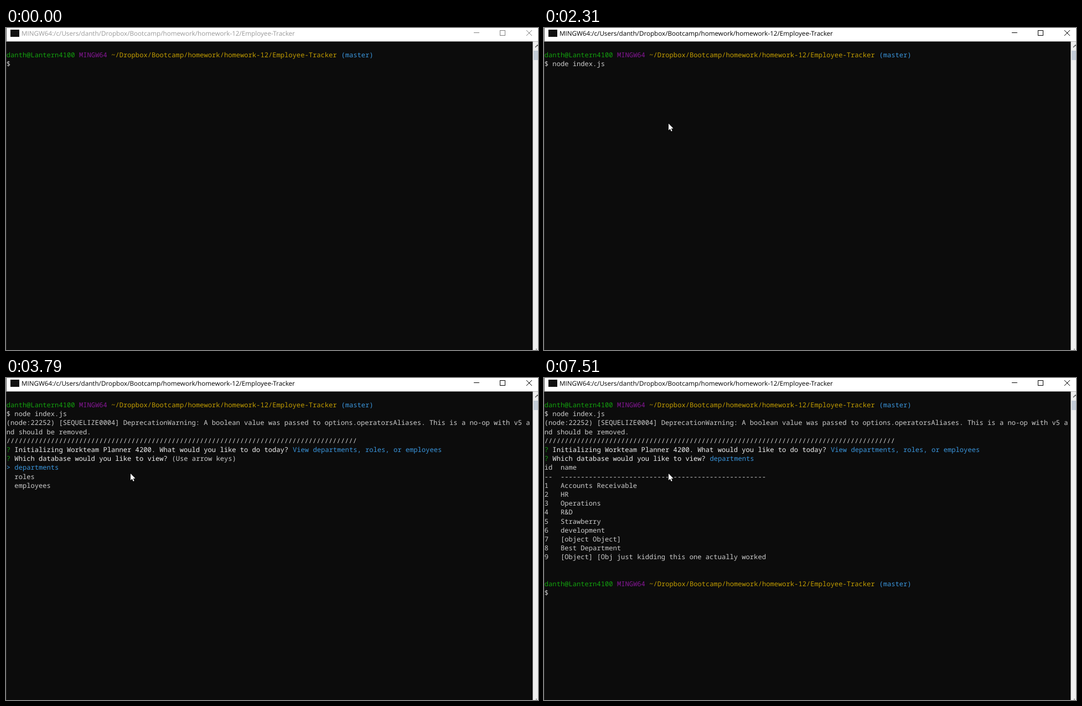
An HTML page with a canvas for the animation above (8 s loop, 961 by 583 pixels).

```html
<!DOCTYPE html>
<html lang="en">
<head>
<meta charset="utf-8">
<title>Terminal session</title>
<style>
  html, body { margin: 0; width: 100%; height: 100%; overflow: hidden; background: #0c0c0c; }
  canvas { display: block; }
</style>
</head>
<body>
<canvas id="stage" width="961" height="583"></canvas>
<script>
const ctx = document.getElementById('stage').getContext('2d');
const W = 961, H = 583, LOOP = 8000;
const BAR = 24.4, SCROLL = 951.5;
const LEFT = 0.8, CELL = 7.285, ROW = 16.2, BASELINE = 53;

const GREEN = '#13a10e', PURPLE = '#881798', YELLOW = '#c19c00', BLUE = '#3a96dd';
const GREY = '#cccccc', BRIGHT = '#f2f2f2', BACK = '#0c0c0c';

const DIR = '/Dropbox/Bootcamp/homework/homework-12/Employee-Tracker';
const TITLE = 'MINGW64:/c/Users/danth' + DIR;

// A line is a list of [text, colour] runs.
const plain = text => [[text, GREY]];
const prompt = [['danth@Lantern4100', GREEN], [' MINGW64', PURPLE], [' ~' + DIR, YELLOW], [' (master)', BLUE]];
const ask = (question, answer, color) => [['?', GREEN], [' ' + question + ' ', BRIGHT], [answer, color]];
const chosen = text => [['> ' + text, BLUE]];

const HINT = '(Use arrow keys)';
const TASK = 'Initializing Workteam Planner 4200. What would you like to do today?';
const VIEW = 'View departments, roles, or employees';
const WHICH = 'Which database would you like to view?';

const start = [prompt, plain('$')];
const command = [prompt, plain('$ node index.js')];
const warned = [
  ...command,
  plain('(node:22252) [SEQUELIZE0004] DeprecationWarning: A boolean value was passed to options.operatorsAliases. This is a no-op with v5 a'),
  plain('nd should be removed.')
];
const banner = [...warned, plain('/'.repeat(87))];
const menu = [
  ...banner,
  ask(TASK, HINT, GREY),
  chosen(VIEW),
  plain('  Add departments, roles, or employees'),
  plain('  Update employee roles'),
  plain('  Quit')
];
const viewing = [...banner, ask(TASK, VIEW, BLUE)];
const submenu = [
  ...viewing,
  ask(WHICH, HINT, GREY),
  chosen('departments'),
  plain('  roles'),
  plain('  employees')
];
const departments = [
  'Accounts Receivable', 'HR', 'Operations', 'R&D', 'Strawberry', 'development',
  '[object Object]', 'Best Department', '[Object] [Obj just kidding this one actually worked'
];
const table = [
  ...viewing,
  ask(WHICH, 'departments', BLUE),
  plain('id  name'),
  plain('--  ' + '-'.repeat(51)),
  ...departments.map((name, i) => plain(`${i + 1}   ${name}`))
];
const done = [...table, [], [], prompt, plain('$')];

// Each step: start time, value.
const screens = [
  [0, start], [1310, command], [2620, warned], [2710, menu],
  [3790, submenu], [5040, table], [7130, done]
];
const carets = [
  [0, null], [1230, [2, 1]], [1310, [15, 1]], [1380, [14, 1]], [1790, null],
  [1930, [0, 2]], [2310, null], [5040, [0, 19]], [5990, null],
  [6520, [0, 19]], [7130, [2, 21]], [7510, null]
];
const pointers = [
  [0, null], [140, [357, 236]], [210, [144, 238]], [450, [160, 224]],
  [530, [188, 203]], [600, [212, 184]], [680, [225, 173]]
];
const FOCUS_TIME = 760;

function at(steps, t) {
  let value = null;
  for (const [time, v] of steps) if (t >= time) value = v;
  return value;
}

function rect(x, y, w, h, color) {
  ctx.fillStyle = color;
  ctx.fillRect(x, y, w, h);
}

function path(points, close) {
  ctx.beginPath();
  points.forEach(([x, y]) => ctx.lineTo(x, y));
  if (close) ctx.closePath();
}

function drawTitleBar(active) {
  const ink = active ? '#000000' : '#999999';
  rect(0, 0, W, BAR, '#ffffff');
  rect(0, 0, 1, BAR, '#555555');
  rect(8, 3, 16, 13, '#111111');
  ctx.font = '11.66px "Open Sans", sans-serif';
  ctx.fillStyle = ink;
  ctx.fillText(TITLE, 28, 14);

  ctx.strokeStyle = active ? '#000000' : '#808080';
  ctx.lineWidth = 1;
  path([[845, 8.5], [855, 8.5]]);
  ctx.stroke();
  ctx.strokeRect(892.5, 4.5, 9, 9);
  path([[940, 4], [950, 14]]);
  ctx.stroke();
  path([[950, 4], [940, 14]]);
  ctx.stroke();
}

function drawScrollBar() {
  rect(SCROLL, BAR, W - SCROLL, H - BAR, '#f0f0f0');
  rect(953, 41, 8, 17, '#c2cbd6');
  ctx.strokeStyle = '#505050';
  ctx.lineWidth = 1.4;
  path([[956, 35], [960, 31], [964, 35]]);
  ctx.stroke();
  rect(957, 581, 2, 1, '#505050');
}

function drawLine(runs, row) {
  let col = 0;
  for (const [text, color] of runs) {
    ctx.fillStyle = color;
    ctx.fillText(text, LEFT + col * CELL, BASELINE + row * ROW);
    col += text.length;
  }
}

function drawCaret([col, row]) {
  rect(LEFT + col * CELL, 52.9 + row * ROW, CELL, 3.3, BRIGHT);
}

function drawPointer([x, y]) {
  ctx.save();
  ctx.translate(x, y);
  path([[0, 0], [0, 12.2], [2.8, 9.6], [4.7, 14], [6.7, 13.2], [4.8, 8.9], [8.6, 8.7]], true);
  ctx.lineWidth = 1.6;
  ctx.strokeStyle = '#000000';
  ctx.stroke();
  ctx.fillStyle = '#ffffff';
  ctx.fill();
  ctx.restore();
}

function draw(t) {
  ctx.textRendering = 'geometricPrecision';
  rect(0, 0, W, H, BACK);
  rect(0, BAR, 1, H - BAR, '#242424');
  drawTitleBar(t >= FOCUS_TIME);
  drawScrollBar();

  ctx.font = '500 12.14px "Noto Sans Mono", monospace';
  at(screens, t).forEach(drawLine);
  const caret = at(carets, t);
  if (caret) drawCaret(caret);
  const pointer = at(pointers, t);
  if (pointer) drawPointer(pointer);
}

const begin = performance.now();
function tick() {
  draw((performance.now() - begin) % LOOP);
  requestAnimationFrame(tick);
}
tick();
</script>
</body>
</html>
```
